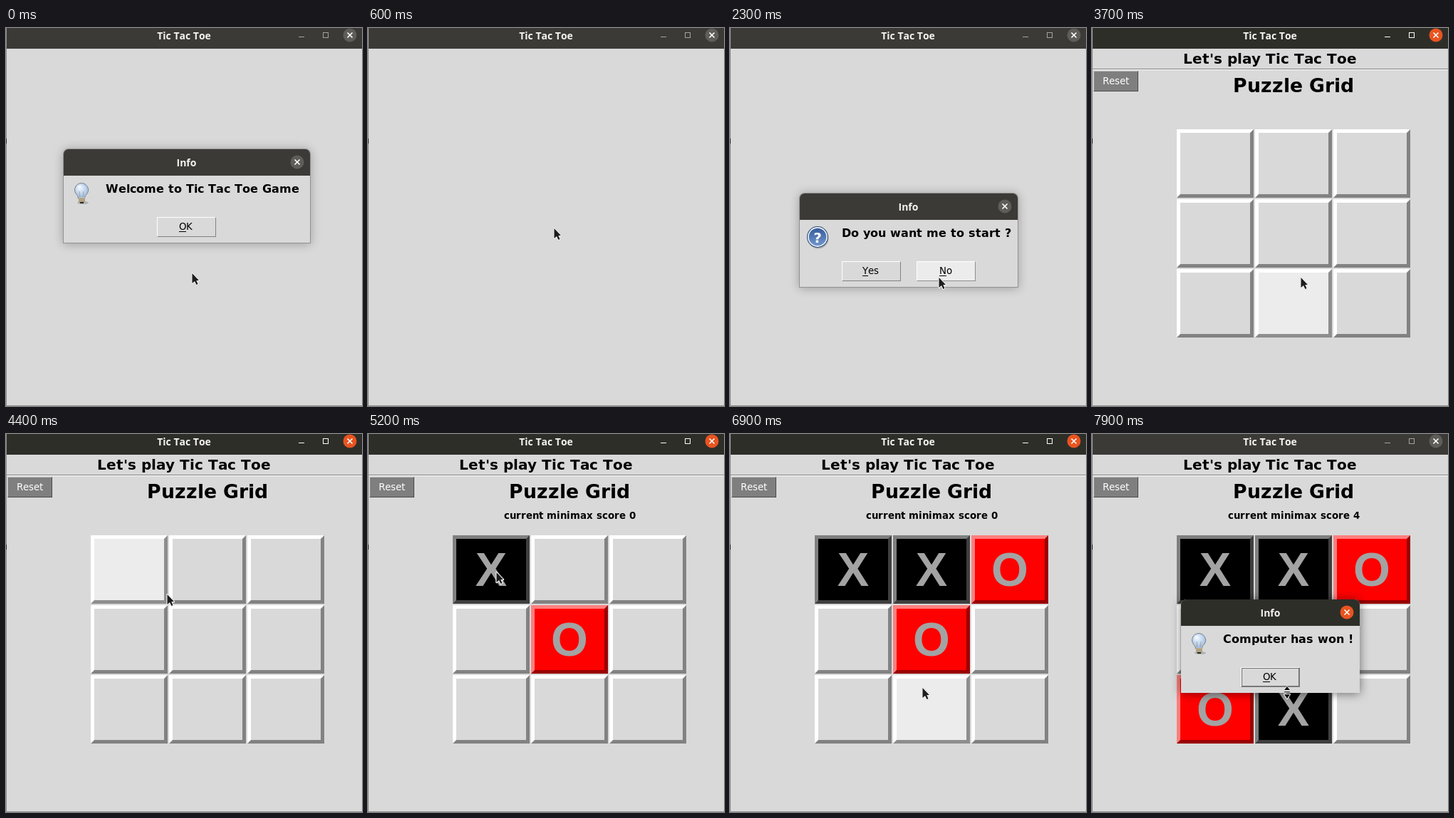
An HTML page with a canvas that plays this animation: 500 by 530 pixels, repeating every 8000 ms.

```html
<!DOCTYPE html>
<html lang="en">
<head>
<meta charset="utf-8">
<title>Tic Tac Toe</title>
<style>
html, body { margin: 0; width: 100%; height: 100%; overflow: hidden; background: #d9d9d9; }
canvas { display: block; }
</style>
</head>
<body>
<canvas id="stage" width="500" height="530"></canvas>
<script>
const ctx = document.getElementById('stage').getContext('2d');
const LOOP = 8000, STEP = 100;
const BOARD_AT = 3600, WON_AT = 7200;
const FACE = '#d9d9d9', OUTLINE = '#929290';
const SANS = '"DejaVu Sans", sans-serif';
const TITLE_FONT = 'bold 14px "Open Sans", "Noto Sans", sans-serif';
const MARK_FONT = 'bold 66.667px "Liberation Sans", Arial, sans-serif';
const SMALL = `13.333px ${SANS}`;
const bold = px => `bold ${px}px ${SANS}`;

// face, light edge, dark edge
const SKINS = {
  plain: [FACE, '#fff', '#828282'],
  hover: ['#ececec', '#fff', '#8e8e8e'],
  X: ['#000', '#7f7f7f', '#3f3f3f'],
  O: ['#f00', '#ff7f7f', '#990000'],
  reset: ['#7f7f7f', '#bfbfbf', '#4c4c4c']
};

// Pointer stops: arrival time, x, y and travel time
const STOPS = [
  [0, 261, 343], [200, 261, 280, 100], [1100, 208, 349], [1400, 225, 362, 300],
  [1800, 293, 335, 400], [1900, 309, 335], [2300, 293, 349], [4100, 282, 272],
  [4400, 226, 224], [4700, 180, 193], [5900, 312, 186, 300], [6900, 270, 355, 400],
  [7600, 302, 383], [7900, 274, 361, 300]
];

// Turns: time, player's cell, computer's cell and its thinking time
const TURNS = [[4900, 0, 4, 300], [6100, 1, 2, 100], [7100, 7, 6, 100]];

const inside = ([px, py], x, y, w, h) => px >= x && px < x + w && py >= y && py < y + h;

function pointerAt(t) {
  let [, x, y] = STOPS[0];
  for (const [arrival, toX, toY, travel = 200] of STOPS.slice(1)) {
    const p = Math.min(1, Math.max(0, 1 - (arrival - t) / travel));
    const eased = p * p * (3 - 2 * p);
    x += (toX - x) * eased;
    y += (toY - y) * eased;
  }
  return [Math.round(x), Math.round(y)];
}

function markAt(cell, t) {
  for (const [time, player, computer, thinking] of TURNS) {
    if (cell === player && t >= time) return 'X';
    if (cell === computer && t >= time + thinking) return 'O';
  }
}

function rect(x, y, w, h, color) {
  ctx.fillStyle = color;
  ctx.fillRect(x, y, w, h);
}

function rounded(x, y, w, h, r, color) {
  ctx.beginPath();
  ctx.roundRect(x, y, w, h, [r, r, 0, 0]);
  ctx.fillStyle = color;
  ctx.fill();
}

function polygon(points, fill, stroke, width) {
  ctx.beginPath();
  points.forEach(([x, y]) => ctx.lineTo(x, y));
  ctx.closePath();
  if (stroke) {
    ctx.strokeStyle = stroke;
    ctx.lineWidth = width;
    ctx.stroke();
  }
  ctx.fillStyle = fill;
  ctx.fill();
}

function disc(x, y, r, color) {
  ctx.beginPath();
  ctx.arc(x, y, r, 0, 2 * Math.PI);
  ctx.fillStyle = color;
  ctx.fill();
}

function line(x1, y1, x2, y2, color, width = 1) {
  ctx.beginPath();
  ctx.moveTo(x1, y1);
  ctx.lineTo(x2, y2);
  ctx.strokeStyle = color;
  ctx.lineWidth = width;
  ctx.stroke();
}

// Glyph advances are whole pixels, as in the toolkit's hinted text.
const advance = ch => Math.round(ctx.measureText(ch).width);

function textWidth(str, font) {
  ctx.font = font;
  return [...str].reduce((sum, ch) => sum + advance(ch), 0);
}

function text(str, x, y, font, color = '#000') {
  ctx.font = font;
  ctx.fillStyle = color;
  for (const ch of str) {
    ctx.fillText(ch, x, y);
    x += advance(ch);
  }
}

function centered(str, x, y, font, color) {
  ctx.font = font;
  ctx.fontKerning = 'none';
  ctx.fillStyle = color;
  ctx.textAlign = 'center';
  ctx.fillText(str, x, y);
  ctx.textAlign = 'left';
}

function bevel(x, y, w, h, b, [face, light, dark]) {
  rect(x, y, w, h, dark);
  polygon([[x, y], [x + w, y], [x + w - b, y + b], [x + b, y + b], [x + b, y + h - b], [x, y + h]], light);
  rect(x + b, y + b, w - 2 * b, h - 2 * b, face);
}

const barColor = active => active ? '#2e2e29' : '#3c3a37';

function closeButton(x, y, active) {
  disc(x, y, 9.5, active ? '#e95420' : '#5f5d59');
  for (const s of [-3.5, 3.5]) line(x - 3.5, y - s, x + 3.5, y + s, '#fff', 1.6);
}

function frame(active) {
  const ink = active ? '#fff' : '#a5a39e';
  rect(0, 0, 500, 530, OUTLINE);
  rect(1, 0, 499, 529, FACE);
  rect(0, 155, 1, 7, '#333');
  rect(1, 0, 499, 29, barColor(active));
  centered('Tic Tac Toe', 250, 16, TITLE_FONT, '#f4f3f0');
  rect(411, 12, 8, 1, ink);
  ctx.strokeStyle = ink;
  ctx.lineWidth = 1;
  ctx.strokeRect(445.5, 6.5, 7, 7);
  closeButton(483, 10, active);
}

function board(t) {
  rect(1, 57, 499, 1, '#828282');
  rect(1, 58, 499, 1, '#fff');
  text("Let's play Tic Tac Toe", 128, 50, bold(20));
  text('Puzzle Grid', 198, 90, bold(26.667));
  bevel(2, 60, 63, 29, 1, SKINS.reset);
  text('Reset', 15, 79, SMALL, '#fff');
  if (markAt(4, t)) text('current minimax score ' + (t >= WON_AT ? 4 : 0), 191, 119, bold(13.333));

  for (let i = 0; i < 9; i++) {
    const x = 119 + i % 3 * 110, y = 142 + Math.floor(i / 3) * 98;
    const mark = markAt(i, t);
    const hovered = t > BOARD_AT && inside(pointerAt(t), x, y, 108, 96);
    bevel(x, y, 108, 96, 5, SKINS[mark || (hovered ? 'hover' : 'plain')]);
    if (mark) centered(mark, x + 54, y + 71, MARK_FONT, '#a3a3a3');
  }
}

function button(label, x, y, t, focused) {
  const hovered = inside(pointerAt(t - STEP), x, y, 83, 28);
  bevel(x, y, 83, 28, 1, SKINS[hovered && !focused ? 'hover' : 'plain']);
  if (focused) {
    ctx.setLineDash([1, 1]);
    ctx.strokeStyle = '#000';
    ctx.lineWidth = 1;
    ctx.strokeRect(x + 1.5, y + 1.5, 80, 25);
    ctx.setLineDash([]);
  }
  const left = Math.floor(x + 41 - textWidth(label, SMALL) / 2);
  text(label, left, y + 18, SMALL);
  rect(left, y + 20, advance(label[0]), 1, '#000');
}

function bulb(x, y) {
  ctx.beginPath();
  ctx.ellipse(x + 2, y + 28, 8, 2, 0, 0, 2 * Math.PI);
  ctx.fillStyle = 'rgba(0,0,0,.18)';
  ctx.fill();
  const glass = ctx.createRadialGradient(x - 3, y + 6, 1, x, y + 10, 12);
  glass.addColorStop(0, '#f4f8fd');
  glass.addColorStop(.5, '#c4d8ef');
  glass.addColorStop(1, '#93b4dc');
  ctx.beginPath();
  ctx.arc(x, y + 10, 9.5, Math.PI * .8, Math.PI * 2.2);
  ctx.quadraticCurveTo(x + 4.5, y + 18, x + 4.5, y + 22);
  ctx.lineTo(x - 4.5, y + 22);
  ctx.quadraticCurveTo(x - 4.5, y + 18, x - 7.7, y + 15.6);
  ctx.fillStyle = glass;
  ctx.fill();
  ctx.strokeStyle = '#7d828a';
  ctx.lineWidth = 1;
  ctx.stroke();
  for (const s of [-1, 1]) line(x + 2 * s, y + 21, x + 3 * s, y + 12, '#a5a5a2');
  for (let i = 0; i < 6; i++) rect(x - 4, y + 21 + i, 9, 1, i % 2 ? '#85775a' : '#dccfae');
  rect(x - 2, y + 27, 5, 2, '#333');
}

function question(x, y) {
  disc(x + 1, y + 2, 14.5, 'rgba(0,0,0,.2)');
  disc(x, y, 15, '#284a78');
  disc(x, y, 13.9, '#f4f7fb');
  const blue = ctx.createLinearGradient(x, y - 12, x, y + 12);
  blue.addColorStop(0, '#365c9c');
  blue.addColorStop(1, '#7196cb');
  disc(x, y, 12.3, blue);
  centered('?', x, y + 7.5, bold(20), '#fff');
}

// A message box centred on (cx, cy)
function dialog(t, { cx, cy, margin = 70, message, icon, labels, active = false, alpha = 1 }) {
  const w = textWidth(message, bold(16)) + margin, h = 133;
  const x = Math.floor(cx - w / 2), y = cy - 67;
  ctx.save();
  ctx.globalAlpha = alpha;
  ctx.shadowColor = active ? 'rgba(0,0,0,.5)' : 'rgba(0,0,0,.28)';
  ctx.shadowBlur = 14;
  ctx.shadowOffsetY = 1;
  if (!active) rounded(x, y, w, h, 8, OUTLINE);
  else rounded(x + 1, y + 1, w - 2, h - 2, 7, FACE);
  ctx.shadowColor = 'transparent';
  rect(x + 1, y + 38, w - 2, h - 39, FACE);
  rounded(x + 1, y + 1, w - 2, 37, 7, barColor(active));
  centered('Info', cx - .5, y + 25, TITLE_FONT, '#f4f3f0');
  closeButton(x + w - 19, y + 19, active);
  icon(x + 26, y);
  text(message, x + 60, y + 62, bold(16));
  labels.forEach((label, i) => {
    const offset = (i - (labels.length - 1) / 2) * 105;
    button(label, Math.floor(cx - 41.5 + offset), y + 96, t, active);
  });
  ctx.restore();
}

const bulbIcon = (x, y) => bulb(x, y + 48);
const questionIcon = (x, y) => question(x, y + 62);

function arrow() {
  const shape = [[.5, 1], [.5, 15], [4, 12], [6.5, 17], [8.5, 16], [6.3, 11], [10, 11]];
  ctx.shadowColor = 'rgba(0,0,0,.25)';
  ctx.shadowBlur = 1;
  polygon(shape, '#fff', '#fff', 2.4);
  ctx.shadowColor = 'transparent';
  polygon(shape, '#1c1c1c');
}

function resizeArrows() {
  polygon([[0, -7], [4, -2], [-4, -2]], '#111', '#eee', 1.5);
  rect(-4, 0, 8, 1, '#333');
  polygon([[0, 10], [4, 4], [-4, 4]], '#111', '#fff', 2);
}

function draw(t) {
  frame(t >= BOARD_AT && t < WON_AT);
  if (t >= BOARD_AT) board(t);
  if (t < 600) {
    dialog(t, { cx: 254, cy: 236, margin: 76, message: 'Welcome to Tic Tac Toe Game', icon: bulbIcon, labels: ['OK'] });
  } else if (t >= 700 && t < BOARD_AT) {
    dialog(t, { cx: 251, cy: 298, message: 'Do you want me to start ?', icon: questionIcon, labels: ['Yes', 'No'], alpha: t < 800 ? .5 : 1 });
  } else if (t >= WON_AT) {
    dialog(t, { cx: 251, cy: 298, message: 'Computer has won !', icon: bulbIcon, labels: ['OK'], active: true, alpha: t < WON_AT + STEP ? .6 : 1 });
  }
  ctx.save();
  ctx.translate(...pointerAt(t));
  ctx.lineJoin = 'round';
  if (t >= 7900) resizeArrows();
  else arrow();
  ctx.restore();
}

// The screen is refreshed in whole steps.
const start = performance.now();
function tick() {
  const t = (performance.now() - start) % LOOP;
  draw(Math.floor(t / STEP) * STEP);
  requestAnimationFrame(tick);
}
tick();
</script>
</body>
</html>
```
